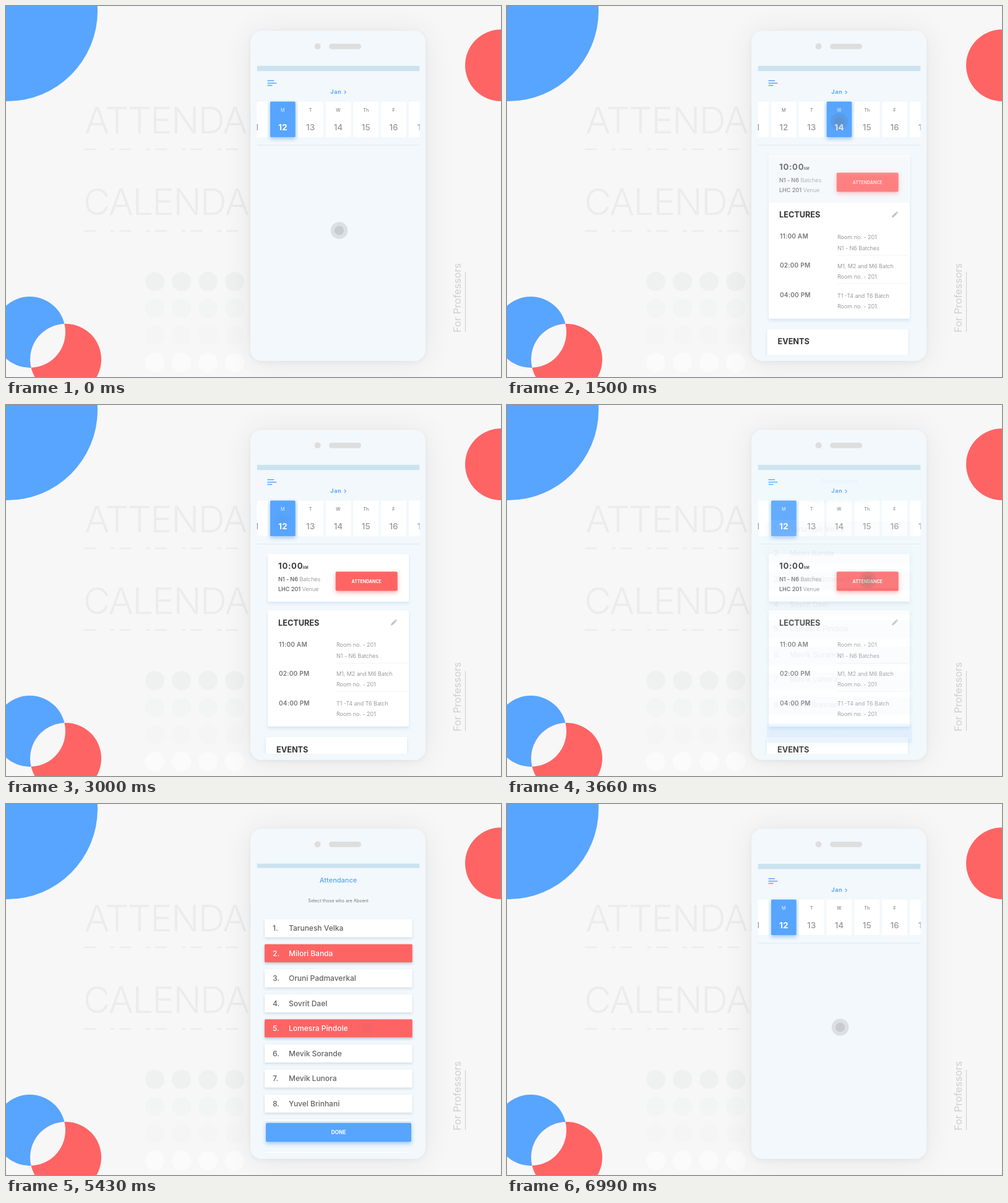
These frames come from a looping animation (800x600 px, 7.08 s). An HTML page with a canvas:

```html
<!DOCTYPE html>
<html lang="en">
<head>
<meta charset="utf-8">
<title>Attendance app</title>
<style>
html, body { margin: 0; width: 100%; height: 100%; overflow: hidden; background: #f7f7f7; }
canvas { display: block; width: 800px; height: 600px; }
</style>
</head>
<body>
<canvas id="stage" width="800" height="600"></canvas>
<script>
const ctx = document.getElementById('stage').getContext('2d');
const LOOP = 7080;
const BLUE = '#57a5ff', RED = '#ff6464', BG = '#f7f7f7', PANEL = '#f2f8fc';
const FONT = 'Inter, "Open Sans", sans-serif';
const SOFT = ['rgba(70,140,200,.16)', 5, 3];
const BLUE_GLOW = ['rgba(60,140,235,.45)', 6, 3];
const RED_GLOW = ['rgba(255,100,100,.5)', 7, 3];
const GREY_GLOW = ['rgba(60,90,120,.18)', 4, 2];

const lerp = (a, b, k) => a + (b - a) * k;

function ramp(t, a, b) {
  const k = Math.min(1, Math.max(0, (t - a) / (b - a)));
  return k * k * (3 - 2 * k);
}

// Rises to 1 and falls back to 0 between a and b
const pulse = (t, a, b) => Math.sin(Math.PI * Math.min(1, Math.max(0, (t - a) / (b - a))));

function group(alpha, fn, dx = 0, dy = 0) {
  if (alpha <= 0) return;
  ctx.save();
  ctx.globalAlpha *= alpha;
  ctx.translate(dx, dy);
  fn();
  ctx.restore();
}

function disc(x, y, r, fill) {
  ctx.fillStyle = fill;
  ctx.beginPath();
  ctx.arc(x, y, r, 0, Math.PI * 2);
  ctx.fill();
}

function box(x, y, w, h, fill, r = 0, shadow) {
  ctx.save();
  if (shadow) [ctx.shadowColor, ctx.shadowBlur, ctx.shadowOffsetY] = shadow;
  ctx.fillStyle = fill;
  ctx.beginPath();
  ctx.roundRect(x, y, w, h, r);
  ctx.fill();
  ctx.restore();
}

function text(str, x, y, size, color, weight = 400, align = 'left', track = 0) {
  ctx.font = `${weight} ${size}px ${FONT}`;
  ctx.letterSpacing = track + 'px';
  ctx.textAlign = align;
  ctx.fillStyle = color;
  ctx.fillText(str, x, y);
  return ctx.measureText(str).width;
}

function line(points, color, width) {
  ctx.strokeStyle = color;
  ctx.lineWidth = width;
  ctx.beginPath();
  points.forEach(([x, y], i) => i ? ctx.lineTo(x, y) : ctx.moveTo(x, y));
  ctx.stroke();
}

function backdrop() {
  ctx.fillStyle = BG;
  ctx.fillRect(0, 0, 800, 600);

  [['ATTENDANCE', 127, 205.5], ['CALENDAR', 125, 337.5]].forEach(([word, x, y]) => {
    text(word, x, y, 59.5, '#ececec', 300, 'left', -1.5);
    for (let i = 0; i < 5; i++) {
      box(126 + 57.5 * i, y + 25, 19, 2.5, '#ececec');
      if (i < 4) box(169 + 57.5 * i, y + 25, 6.5, 2.5, '#ececec');
    }
  });

  ['#eff1f1', '#f3f4f4', '#f5f5f5', '#fafbfa'].forEach((c, row) => {
    for (let i = 0; i < 4; i++) disc(240.5 + 43 * i, 445.5 + 43.7 * row, 15.6, c);
  });

  disc(2, 8, 146, BLUE);
  disc(800, 96, 58, RED);
  disc(38.5, 527.5, 57.5, BLUE);
  disc(96.5, 571.5, 57.5, RED);
  ctx.save();
  ctx.beginPath();
  ctx.arc(38.5, 527.5, 57.5, 0, Math.PI * 2);
  ctx.clip();
  disc(96.5, 571.5, 57.5, BG);
  ctx.restore();

  ctx.save();
  ctx.translate(735, 528);
  ctx.rotate(-Math.PI / 2);
  text('For Professors', 0, 0, 16.3, '#cfcfcf');
  ctx.restore();
  line([[742.5, 430], [742.5, 527]], '#cfcfcf', 1);

  box(395, 40, 283, 534, PANEL, 18, ['rgba(0,0,0,.075)', 50, 2]);
  box(395, 40, 283, 534, PANEL, 18, ['rgba(0,0,0,.05)', 9, 2]);
  disc(503.5, 65.2, 5, '#dedede');
  box(522, 61, 52, 8.7, '#dedede', 4.3);
}

function tile(i, day, num, on) {
  const x = 427 + 44.8 * i, mid = x + 20.3;
  box(x, 154.5, 40.7, 57.5, '#fff', 1);
  text(day, mid, 170.7, 7.2, '#6c6c6c', 400, 'center');
  text(num, mid, 200.8, 13.5, '#989898', 500, 'center');
  group(on, () => {
    box(x, 154.5, 40.7, 57.5, BLUE, 1.5, BLUE_GLOW);
    text(day, mid, 170.7, 7.2, '#eaf4ff', 400, 'center');
    text(num, mid, 200.8, 13.7, '#fff', 700, 'center');
  });
}

function nextClass(press) {
  box(423, 241, 228, 77, '#fff', 2, SOFT);
  text('10:00', 440, 264.5, 13, '#3a3a3a', 700, 'left', 0.8);
  text('AM', 479.5, 264.5, 5.5, '#3a3a3a', 600);
  [['N1 - N6', ' Batches', 285], ['LHC 201', ' Venue', 300.7]].forEach(([a, b, y]) => {
    const w = text(a, 440, y, 9, '#6c6c6c', 600);
    text(b, 440 + w, y, 9, '#808080', 300);
  });
  const s = 1 - 0.03 * press;
  ctx.save();
  ctx.translate(582.7, 285);
  ctx.scale(s, s);
  box(-50, -15.5, 100, 31, RED, 2, RED_GLOW);
  text('ATTENDANCE', 0, 3.1, 7, '#fff', 700, 'center');
  ctx.restore();
}

function lectures(rules) {
  box(423, 332, 228, 188, '#fff', 2, SOFT);
  text('LECTURES', 440, 356.7, 12.7, '#343434', 700);

  ctx.save();
  ctx.translate(626.5, 352);
  ctx.rotate(-Math.PI / 4);
  box(-4, -1.6, 8, 3.2, '#c2c2c2');
  box(4.6, -1.6, 1.8, 3.2, '#c2c2c2', 0.6);
  ctx.fillStyle = '#c2c2c2';
  ctx.beginPath();
  ctx.moveTo(-4, -1.6);
  ctx.lineTo(-6.6, 0);
  ctx.lineTo(-4, 1.6);
  ctx.fill();
  ctx.restore();

  [['11:00 AM', 390.8, 'Room no. - 201', 391, 'N1 - N6 Batches', 409.2],
   ['02:00 PM', 437.5, 'M1, M2 and M6 Batch', 438, 'Room no. - 201', 455],
   ['04:00 PM', 485.7, 'T1 -T4 and T6 Batch', 486, 'Room no. - 201', 503]
  ].forEach(([time, y, a, ya, b, yb]) => {
    text(time, 441, y, 10, '#757575', 600, 'left', 0.25);
    text(a, 534, ya, 9, '#7d7d7d', 300);
    text(b, 534, yb, 9, '#7d7d7d', 300);
  });
  group(rules, () => [417, 462.5].forEach(y => box(533, y, 116, 1, '#f2f3f4')));
}

function events() {
  box(423, 447.5, 228, 91.5, '#fff', 2, SOFT);
  text('EVENTS', 440, 472, 12.7, '#343434', 700);
  text('No Event Today', 537, 506, 10.3, '#6e6e6e', 300, 'center');
}

function dashboard(t) {
  box(405.5, 96.7, 263, 8.6, '#cbe3ee');
  [[120.7, 433], [124.7, 437.3], [128.5, 430.3]].forEach(([y, x]) =>
    line([[422.5, y], [x, y]], BLUE, 1.5));
  text('Jan', 524.3, 142.3, 9, BLUE, 700, 'left', 0.6);
  line([[546.8, 137], [549.3, 139.6], [546.8, 142.2]], BLUE, 1.1);

  const on14 = ramp(t, 1260, 1500) - ramp(t, 2400, 2640);
  const tiles = [['S', 11], ['M', 12], ['T', 13], ['W', 14], ['Th', 15], ['F', 16], ['S', 17]];
  tiles.forEach(([day, num], i) =>
    tile(i - 1, day, num, num === 12 ? 1 - on14 : num === 14 ? on14 : 0));
  box(405.5, 224.2, 263, 1.4, '#e2edf4');

  const shown = t < 5500 ? ramp(t, 60, 360) : 0;
  const swap = ramp(t, 1350, 1950) - ramp(t, 2400, 2790);
  group(shown, () => {
    group(1 - Math.min(1, swap * 1.8), () => nextClass(pulse(t, 3420, 3630)));
    group(1, () => lectures(1 - swap), 0, -90.5 * swap);
    group(1, events, -3 * (1 - swap), 89.5 * (1 - swap));
  });
}

const STUDENTS = ['Tarunesh Velka', 'Milori Banda', 'Oruni Padmaverkal', 'Sovrit Dael',
  'Lomesra Pindole', 'Mevik Sorande', 'Mevik Lunora', 'Yuvel Brinhani'];

function student(name, i, absent, lift) {
  const y = 186.2 + 40.5 * i - lift * (1 - absent);
  const label = color => {
    text(i + 1 + '.', 431, y + 19, 12, color, 500);
    text(name, 457, y + 19, 12, color, 500);
  };
  box(418, y, 238.5, 29.3, '#fff', 1.5, GREY_GLOW);
  label('#626262');
  group(absent, () => {
    box(418, y, 238.7, 29.3, RED, 1.5, GREY_GLOW);
    label('#fff');
  });
}

function attendance(t) {
  box(405.5, 96, 263, 468, PANEL);
  box(405.5, 96.4, 263, 7.2, '#cbe3ee');
  text('Attendance', 537, 127.3, 11, BLUE, 500, 'center');
  text('Select those who are Absent', 537, 159, 7.2, '#7a7a7a', 400, 'center');
  STUDENTS.forEach((name, i) => {
    const absent = i === 1 ? ramp(t, 4500, 4770) : i === 4 ? ramp(t, 5190, 5430) : 0;
    student(name, i, absent, i === 1 || i === 4 ? 1.6 : 0);
  });
  box(418, 510.2, 238.5, 2.2, '#fff', 1, GREY_GLOW);
  box(420, 562.8, 228, 1.2, '#fff');

  const s = 1 - 0.02 * pulse(t, 5850, 6060);
  ctx.save();
  ctx.translate(537.5, 531);
  ctx.scale(s, s);
  box(-117.5, -15.3, 235, 30.6, BLUE, 2, BLUE_GLOW);
  text('DONE', 0, 3, 8.4, '#fff', 700, 'center');
  ctx.restore();
}

// Moves: start, end, x, y
const MOVES = [
  [60, 360, 538.5, 357], [810, 1140, 537, 187], [1590, 1980, 447, 187],
  [3060, 3390, 583, 283], [4140, 4440, 583, 241], [4860, 5160, 583, 362],
  [5580, 5850, 538.5, 531], [6420, 6990, 538.5, 361]
];
const CLICKS = [1170, 2280, 3420, 4470, 5190, 5850];

function pointer(t) {
  let x = 538.5, y = 363;
  for (const [a, b, tx, ty] of MOVES) {
    const k = ramp(t, a, b);
    x = lerp(x, tx, k);
    y = lerp(y, ty, k);
  }
  const press = CLICKS.reduce((p, c) => p + pulse(t, c, c + 210), 0);
  const dim = ramp(t, 2550, 2790) - ramp(t, 3000, 3150) +
              ramp(t, 5280, 5430) - ramp(t, 5580, 5700);
  const s = 1 - 0.15 * press;
  group(1 - 0.82 * dim, () => {
    disc(x, y, 13.8 * s, 'rgba(110,110,110,.17)');
    disc(x, y, 7.6 * s, 'rgba(110,110,110,.17)');
  });
}

function draw(t) {
  backdrop();
  ctx.save();
  ctx.beginPath();
  ctx.rect(405.5, 96, 263, 468);
  ctx.clip();
  const open = ramp(t, 3630, 3810) - ramp(t, 6300, 6600);
  const veil = ramp(t, 5970, 6180);
  if (open < 1) dashboard(t);
  group(open, () => {
    attendance(t);
    group(0.3 * veil, () => box(405.5, 96, 263, 468, PANEL));
  });
  pointer(t);
  ctx.restore();
}

const start = performance.now();
function tick() {
  draw((performance.now() - start) % LOOP);
  requestAnimationFrame(tick);
}
tick();
</script>
</body>
</html>
```
